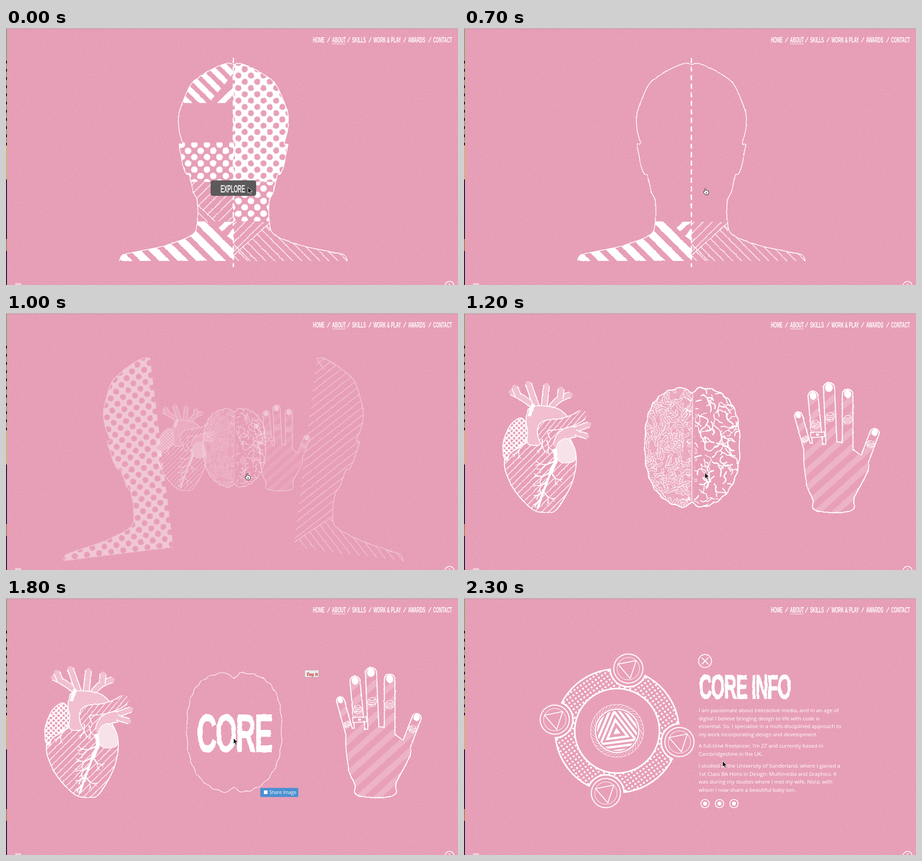
An HTML page for the animation above (2400 ms loop, 992 px wide and 565 px high).

```html
<!DOCTYPE html>
<html lang="en">
<head>
<meta charset="utf-8">
<title>About</title>
<style>
html, body { margin: 0; width: 100%; height: 100%; overflow: hidden; background: #e8a0b8; }
svg { display: block; width: 992px; height: 565px; }
.line { fill: none; stroke: #fff; stroke-linecap: round; stroke-linejoin: round; }
.cond { font-family: "Liberation Sans", Arial, sans-serif; font-weight: 700; fill: #fff; }
.big { letter-spacing: -.04em; stroke: #fff; stroke-width: 2; }
.body { font: 11.55px "Open Sans", "Noto Sans", sans-serif; fill: #fff; }
</style>
</head>
<body>
<svg id="stage" viewBox="0 0 992 565"></svg>
<script>
const PINK = '#e8a0b8', PALE = '#f1bfd0', LOOP = 2400, STEP = 100;
const $ = id => document.getElementById(id);

let seed = 11;
const rnd = () => (seed = (seed * 16807) % 2147483647) / 2147483647;

// Smooth path through a flat list of coordinates.
const nums = s => typeof s === 'string' ? s.trim().split(/\s+/).map(Number) : s;
function curve(src, closed) {
  const v = nums(src), n = v.length / 2;
  const at = i => {
    const k = closed ? (i + n) % n : Math.max(0, Math.min(n - 1, i));
    return [v[2 * k], v[2 * k + 1]];
  };
  let d = 'M' + at(0);
  for (let i = 0; i < (closed ? n : n - 1); i++) {
    const [a, b, c, e] = [at(i - 1), at(i), at(i + 1), at(i + 2)];
    const c1 = [0, 1].map(k => (b[k] + (c[k] - a[k]) / 6).toFixed(1));
    const c2 = [0, 1].map(k => (c[k] - (e[k] - b[k]) / 6).toFixed(1));
    d += `C${c1} ${c2} ${c}`;
  }
  return d + (closed ? 'Z' : '');
}

const line = (d, w = 2, more = '') => `<path class="line" d="${d}" stroke-width="${w}" ${more}/>`;
const fill = (d, f, more = '') => `<path d="${d}" fill="${f}" ${more}/>`;
const box = (x, y, w, h, f, more = '') =>
  `<rect x="${x}" y="${y}" width="${w}" height="${h}" fill="${f}" ${more}/>`;
const dot = (x, y, r, f = '#fff', more = '') => `<circle cx="${x}" cy="${y}" r="${r}" fill="${f}" ${more}/>`;
const ring = (x, y, r, w) => dot(x, y, r, 'none', `stroke="#fff" stroke-width="${w}"`);
const group = (id, body, more = '') => `<g id="${id}" ${more}>${body}</g>`;
const clip = (id, body) => `<clipPath id="${id}">${body}</clipPath>`;
const within = (id, body, more = '') => `<g clip-path="url(#${id})" ${more}>${body}</g>`;
const cond = (x, y, size, str, more = '') =>
  `<text class="cond" transform="translate(${x} ${y}) scale(.515 1)" font-size="${size}" ${more}>${str}</text>`;

// Patterns and filters
const pat = (id, x, y, size, body, turn = 0) =>
  `<pattern id="${id}" patternUnits="userSpaceOnUse" x="${x}" y="${y}" width="${size}" height="${size}" patternTransform="rotate(${turn})">${body}</pattern>`;
const five = (s, r, f) => [[0, 0], [s, 0], [0, s], [s, s], [s / 2, s / 2]].map(p => dot(p[0], p[1], r, f)).join('');
const bars = (id, period, w, turn, off = 0, ink = '#fff', paper = 'none') =>
  pat(id, 0, off, period, box(0, 0, period, period, paper) + box(0, 0, period, w, ink), turn);
const rough = (id, scale, freq) =>
  `<filter id="${id}" filterUnits="userSpaceOnUse" x="-20" y="-20" width="1040" height="620" color-interpolation-filters="sRGB">
  <feTurbulence type="fractalNoise" baseFrequency="${freq}" numOctaves="2" seed="4"/>
  <feDisplacementMap in="SourceGraphic" scale="${scale}" xChannelSelector="R" yChannelSelector="G"/></filter>`;

// Head: one half, mirrored about its middle
const MID = 499;
const half = nums(`499 80 483 78 446 94 409 120 391 155 379 190 380 225 387 253 380 257 384 280 389 305
  396 321 403 325 411 360 420 380 420 425 408 455 350 478 285 492 256 499 249 512`);
const leftEdge = curve(half);
const rightEdge = curve(half.map((v, i) => i % 2 ? v : 2 * MID - v));
const ROW = 86.8, rowTop = r => 78 + r * ROW;
const band = (side, row, look) => box(side === 'hl' ? 240 : MID, rowTop(row), 260, ROW, `url(#${look})`);

function head() {
  const left = [
    band('hl', 0, 'wideTop') + fill('M499 100V165H445Z', PINK) + fill('M463 165L499 130V146L481 165Z', '#fff'),
    '',
    band('hl', 2, 'dots'),
    fill('M400 339H499V426H457L415 386Z', 'url(#thinUp)') + line('M420 388L460 426M420 404L442 426', 1.4),
    band('hl', 4, 'wide') + fill('M445 425H499V475Z', PINK) + fill('M480 426H499L474 447L467 440ZM499 441L485 457L499 468Z', '#fff')];
  const right = ['holes', 'holes', 'holes', 'dots', 'thinDown'].map((look, r) => band('hr', r, look));
  right[4] += fill('M499 425H581L499 500Z', PINK) + fill('M499 426H581L499 500Z', 'url(#thinUp)') +
    line('M578 429L499 500M571 437L579 445M499 474L536 512', 1.5);
  const rows = (side, list) => list.map((b, r) => within(side, b, `data-row="${r}"`)).join('');
  return rows('hl', left) + rows('hr', right) + line(leftEdge, 1.7) + line(rightEdge, 1.7) +
    line('M499 67V524', 3, 'stroke-dasharray="9 9.8"');
}
const halfL = fill(leftEdge + 'L499 512Z', 'url(#holes)') + line(leftEdge, 1.7);
const halfR = within('hr', box(MID, 76, 260, 436, 'url(#thinUp)') +
  fill('M499 500L578 432L760 470V512H499Z', PINK) + fill('M510 512V490L578 432L760 470V512Z', 'url(#thinDown)') +
  line('M578 432L499 500M499 81L520 104', 1.5)) + line(rightEdge, 1.7);

// Heart
function twig(x, y, a, len, w) {
  if (len < 6) return '';
  const x2 = x + Math.cos(a) * len, y2 = y + Math.sin(a) * len;
  return line(`M${x} ${y}L${x2} ${y2}`, w) +
    [-1, 1].map(s => twig(x2, y2, a + s * (.35 + rnd() * .4), len * .62, w * .75)).join('');
}
function heart() {
  const tube = (d, w, f = PALE) => line(d, w + 4, 'style="stroke-linecap:butt"') + line(d, w, `style="stroke:${f}"`);
  const part = (pts, f, w = 2) => fill(curve(pts, true), f) + line(curve(pts, true), w);
  const veins = [[201, 325], [190, 350], [183, 370], [174, 392], [166, 412]]
    .map(([x, y], i) => twig(x, y, 2.75 - i * .1, 23 - 3 * i, 3) + (i % 2 ? twig(x, y, .9, 17, 2.6) : '')).join('');
  return part('90 320 137 285 200 240 243 300 240 365 205 430 180 438 148 430 105 380', 'url(#thinHeart)', 2.2) +
    ['M162 214Q140 190 104 174', 'M119 182L111 163', 'M163 216L141 155', 'M175 214L181 159', 'M187 218Q198 188 233 180', 'M211 188L213 167']
      .map(d => tube(d, 11)).join('') +
    part('138 264 137 225 150 206 190 206 214 215 227 238 175 262 168 288 141 288', PALE) +
    line('M151 203L144 224', 8) +
    tube('M180 284Q160 246 192 246Q232 244 259 224', 21, 'url(#thinTube)') +
    tube('M208 290Q212 262 246 261', 22) + tube('M244 256L274 245', 10) + tube('M244 263L270 271', 10) +
    part('127 231 139 255 134 285 102 308 96 322 89 320 86 285 103 245', 'url(#holesSmall)') +
    part('204 290 225 276 244 300 241 326 209 326', '#f8e2ea', 1.4) +
    line(curve('199 302 201 325 190 350'), 8) + line(curve('190 350 176 388 162 428'), 5) + veins +
    [[125, 290], [172, 278], [182, 280]].map(([x, y], i) => twig(x, y, 1.9 - i * .3, 16, 2.4)).join('');
}

// Brain: a squarish oval with a scalloped edge and a notch at each end
function oval() {
  const pts = [];
  for (let i = 0; i < 120; i++) {
    const a = i / 120 * Math.PI * 2, s = Math.sin(a), c = Math.cos(a), p = c > 0 ? 2 / 2.8 : 2 / 2.3;
    const bump = 1 + .01 * Math.sin(a * 27);
    const dx = 104 * Math.sign(s) * Math.abs(s) ** p * bump;
    const dy = -132 * Math.sign(c) * Math.abs(c) ** p * bump;
    pts.push(501 + dx, 296 + dy + Math.sign(c) * 12 * Math.exp(-dx * dx / 90));
  }
  return curve(pts, true);
}
const brainEdge = oval();
function worm(x, y, n, len) {
  let a = rnd() * 6.3;
  const p = [x, y];
  for (let i = 0; i < n; i++) {
    a += (rnd() - .5) * 2;
    p.push(x += Math.cos(a) * len, y += Math.sin(a) * len);
  }
  return curve(p);
}
function folds() {
  let s = box(390, 160, 112, 270, PALE, 'opacity=".35"');
  for (let y = 172; y < 426; y += 13)
    for (let x = 400; x < 492; x += 15) {
      const d = worm(x + rnd() * 8, y + rnd() * 8, 4, 6);
      s += line(d, 6) + line(d, 4.2, 'style="stroke:#ecb0c5"');
    }
  for (let y = 174; y < 426; y += 15)
    for (let x = 512; x < 604; x += 16)
      s += line(worm(x + rnd() * 9, y + rnd() * 9, 5, 6), 1.4 + rnd() * 1.6);
  return within('brainClip', s + line('M505 172Q501 290 501 424', 8, `style="stroke:${PINK}"`) +
    line('M502 180Q500 290 500 414', 1.5));
}

// Hand: fingers as capsules joined to a palm
// tip x, tip y, base x, base y, width, knuckle position
const fingers = [[734, 226, 758, 312, 15, .6], [766, 183, 777, 300, 20, .53], [801, 165, 807, 300, 22, .47],
  [842, 179, 842, 300, 21, .46], [901, 264, 873, 338, 18, .33]];
function hand() {
  const palm = curve('749 295 753 375 767 410 769 431 811 438 853 431 856 405 887 337 860 306 826 285 790 290', true);
  const skin = 'style="stroke:url(#softBars)"';
  const bones = fingers.map(([x, y, bx, by]) => `M${x} ${y}L${bx} ${by}`);
  const details = fingers.map(([x, y, bx, by, w, k]) => {
    const turn = Math.atan2(by - y, bx - x) * 180 / Math.PI - 90, len = Math.hypot(bx - x, by - y) * k, r = w * .44;
    return `<g transform="translate(${x} ${y}) rotate(${turn})"><ellipse cy="-1" rx="${w * .38}" ry="${w * .44}" fill="#fff"/>
      <g transform="translate(0 ${len})">${dot(0, 0, r, PINK, 'stroke="#fff" stroke-width="1.3"')}
      ${[-.45, 0, .45].map(j => line(`M${-r * .7} ${j * r}Q0 ${j * r + 2} ${r * .7} ${j * r}`, 1.8)).join('')}</g></g>`;
  }).join('');
  return line(palm, 4.5) + bones.map((d, i) => line(d, fingers[i][4] + 4.5)).join('') +
    fill(palm, 'url(#softBars)') + bones.map((d, i) => line(d, fingers[i][4], skin)).join('') + details +
    box(761, 262, 30, 11, PINK, 'stroke="#fff" stroke-width="2" transform="rotate(-4 776 268)"') + box(773, 265, 6, 5, '#fff');
}

// Info panel
const paragraphs = [
  [251, ['I am passionate about interactive media, and in an age of', 'digital I believe bringing design to life with code is',
    'essential. So, I specialise in a multi-disciplined approach to', 'my work incorporating design and development.']],
  [329.4, ['A full-time freelancer, I’m 27 and currently based in', 'Cambridgeshire in the UK.']],
  [373, ['I studied at the University of Sunderland, where I gained a', '1st Class BA Hons in Design: Multimedia and Graphics. It',
    'was during my studies where I met my wife, Nora; with', 'whom I now share a beautiful baby son.']]];
const copy = paragraphs.map(([y, rows]) =>
  rows.map((s, i) => `<text class="body" x="515" y="${y + i * 17.5}">${s}</text>`).join('')).join('');

function wheel() {
  const badges = [0, 90, 180, 270].map(a => {
    const r = a * Math.PI / 180, x = 139 * Math.sin(r), y = -139 * Math.cos(r);
    return dot(x, y, 39, PINK) + within('disc', ring(x, y, 40, 3.4)) +
      `<g transform="translate(${x} ${y})">${ring(0, 0, 32, 2.2)}${ring(0, 0, 24.5, 1)}
      <path class="line tri" d="M-20.5 -14H20.5L0 22Z" stroke-width="1.9"/></g>`;
  }).join('');
  const edge = 'stroke="#fff" stroke-width="3.4"';
  return dot(0, 0, 136, 'url(#fine)', edge) + dot(0, 0, 93, PINK, edge) + badges;
}
function emblem() {
  const tri = r => `M0 ${-2 * r}L${1.732 * r} ${r}H${-1.732 * r}Z`;
  let rays = '';
  for (let a = 0; a < 6.28; a += .16)
    rays += `M${47 * Math.cos(a)} ${47 * Math.sin(a)}L${58 * Math.cos(a + .3)} ${58 * Math.sin(a + .3)}`;
  let stripes = '';
  for (let r = 13; r < 45; r += 9.5) stripes += line(tri(r), 5, 'style="stroke-linejoin:miter"');
  return ring(0, 0, 58, 1) + line(rays, .8) + ring(0, 0, 47.5, 2.2) +
    within('core', `<g transform="translate(-1 2)">${fill(tri(4.5), '#fff')}${stripes}</g>`);
}

// Page frame
const nav = [[674, 'HOME'], [716, 'ABOUT'], [760, 'SKILLS'], [807, 'WORK &amp; PLAY'], [883, 'AWARDS'], [938, 'CONTACT']];
const frame = box(0, 0, 992, 1, '#dcd6d8') + box(0, 1, 992, 1, '#a98f99') +
  box(0, 2, 2, 250, '#7fa86a') + box(0, 250, 2, 83, '#c6bd62') + box(0, 333, 2, 232, '#14142e') + box(0, 464, 2, 26, '#a87f4e') +
  line('M1 72V262', 2, 'style="stroke:#111;stroke-linecap:butt" stroke-dasharray="6 12"') +
  nav.map(([x, s], i) => cond(x - .5, 31.6, 16.7, s) + (i ? line(`M${x - 10.5} 31L${x - 5.5} 21`, 1.6) : '')).join('') +
  box(716, 34.5, 29, 1, '#fff') + box(20, 561, 13, 4, '#fff', 'opacity=".5"') + ring(973.5, 567, 10, 1.7) + dot(973.5, 563, 1.3);

const arrow = fill('M0 0V13L3 10.3L5.2 15.2L7.5 14.2L5.4 9.5H9.5Z', '#111', 'stroke="#fff" stroke-width=".9"');
const pointer = fill('M3.5 8V2Q4.7 0 6 2V5.5Q7.5 4.6 8.2 6Q10 5.2 10.5 6.8Q12.5 6.5 12.5 8.5V11L10.8 15H5L1 10Q0 7.4 2 8Z',
  '#fff', 'stroke="#111" stroke-width="1"') + line('M6.5 9.5V12.5M8.5 9.5V12.5', .8, 'style="stroke:#111"');

const ROUGH = 'filter="url(#rough)"', INK = 'filter="url(#ink)"';
$('stage').innerHTML = `<defs>
  ${pat('dots', 468.6, 256.2, 27.6, five(27.6, 7.2, '#fff'))}
  ${pat('holes', 468.6, 256.2, 27.6, box(0, 0, 27.6, 27.6, '#fff') + five(27.6, 6.7, PINK))}
  ${pat('holesSmall', 0, 0, 11, box(0, 0, 11, 11, '#fff') + five(11, 2.7, PINK))}
  ${pat('fine', 0, 0, 12, five(12, 2.3, '#fff'))}
  ${bars('wideTop', 22.6, 12.5, 45, 8)}${bars('wide', 29, 17, 45, -8.5)}
  ${bars('thinUp', 14, 1.5, -45)}${bars('thinDown', 14, 1.5, 45)}
  ${bars('thinHeart', 11, 1.5, -45, 0, '#fff', PINK)}${bars('thinTube', 9, 1.4, -50, 0, '#fff', PINK)}
  ${bars('softBars', 27, 13, -42, 0, '#edb3c6', PINK)}
  ${rough('rough', 2.6, .12)}${rough('ink', 3.5, .08)}
  <filter id="grain" x="0" y="0" width="1" height="1" color-interpolation-filters="sRGB">
  <feTurbulence type="fractalNoise" baseFrequency=".25" numOctaves="2" seed="2"/>
  <feColorMatrix values="0 0 0 0 .78  0 0 0 0 .47  0 0 0 0 .6  .35 0 0 0 -.15"/></filter>
  ${clip('hl', fill(leftEdge + 'L499 512Z', '#000'))}${clip('hr', fill(rightEdge + 'L499 512Z', '#000'))}
  ${clip('brainClip', fill(brainEdge, '#000'))}${clip('disc', dot(0, 0, 137.5))}${clip('core', dot(0, 0, 44))}
</defs>
${box(0, 0, 992, 565, PINK)}${box(0, 0, 992, 565, PINK, 'filter="url(#grain)"')}
${group('head', head(), ROUGH)}
${group('button', box(449, 335, 100, 34, '#5d595a', 'rx="5"') + cond(471, 360.5, 22, 'EXPLORE', 'style="font-weight:400" stroke="#fff" stroke-width=".8"'))}
${group('halfL', halfL, ROUGH)}${group('halfR', halfR, ROUGH)}
${group('heart', heart(), ROUGH)}${group('palm', hand(), ROUGH)}
${group('brain', group('folds', folds()) + `<path id="rim" class="line" d="${brainEdge}"/>`, ROUGH)}
${group('label', group('word', cond(419, 338, 117, 'CORE', 'class="cond big"').replace('class="cond" ', ''), INK) +
  box(655.5, 158.5, 31, 15.5, '#eee9e6', 'stroke="#b9a8ad"') +
  '<text x="659" y="170.5" font-family="Liberation Serif, serif" font-size="11" font-weight="700" font-style="italic" fill="#c2202c">Tag it</text>' +
  box(558, 417.5, 83.5, 20, '#4b90d0', 'rx="2"') + box(566, 423, 8, 8, '#fff') +
  '<text class="body" x="578" y="431" style="font-size:10.2px">Share Image</text>')}
${group('info', `<g transform="translate(336 292)"><g id="wheel">${wheel()}</g><g id="emblem">${emblem()}</g></g>` +
  ring(529, 138.5, 14.3, 2) + line('M522 131.5L536 145.5M536 131.5L522 145.5', 2) +
  `<g ${INK}>${cond(516, 221, 75, 'CORE INFO', 'class="cond big"').replace('class="cond" ', '')}</g>` + copy +
  [529, 560.7, 592.5].map(x => ring(x, 452, 9.2, 1.8) + dot(x, 452, 4.5)).join(''))}
${frame}
${group('arrow', arrow)}${group('pointer', pointer)}`;

const show = (id, on) => { $(id).style.display = on ? '' : 'none'; };
const place = (id, tf) => $(id).setAttribute('transform', tf);
const ramp = (t, from, to) => Math.max(0, Math.min(1, (t - from) / (to - from)));
const rows = [...document.querySelectorAll('[data-row]')];
const tris = [...document.querySelectorAll('.tri')];

// Mouse path: time, x, y
const path = [[0, 531, 350], [1200, 528.5, 351], [1500, 503, 316], [1600, 500, 308], [2000, 498.5, 308], [2300, 567.5, 358.5]];
function mouse(t) {
  const i = Math.max(1, path.findIndex(p => p[0] >= t)), [a, b] = [path[i - 1], path[i]];
  const k = ramp(t, a[0], b[0]);
  return [a[1] + (b[1] - a[1]) * k, a[2] + (b[2] - a[2]) * k];
}

function draw(t) {
  show('head', t < 800);
  show('button', t < 600);
  rows.forEach(e => { e.style.display = e.dataset.row === '4' || t < 100 * (+e.dataset.row + 1) ? '' : 'none'; });

  // The head splits and fades
  const p = ramp(t, 800, 1100), dx = 178 * p * p * (3 - 2 * p);
  [['halfL', -1], ['halfR', 1]].forEach(([id, dir]) => {
    show(id, t >= 800 && t < 1200);
    place(id, `translate(${MID + dir * dx} ${512 + dx * .025}) rotate(${dir * dx * .053}) scale(${1 - dx * .00023}) translate(${-MID} -512)`);
    $(id).style.opacity = 1 - .87 * p;
  });

  // The organs grow apart from the centre
  const q = ramp(t, 800, 1200), travel = q ** 1.6;
  [['heart', 180], ['brain', 500], ['palm', 820]].forEach(([id, x]) => {
    show(id, t >= 900 && t < 2000);
    place(id, `translate(${501 - travel + (x - 500) * travel} ${297 - travel}) scale(${.32 + .68 * q}) translate(${-x} -296)`);
    $(id).style.opacity = q ** 1.25;
  });
  const hover = ramp(t, 1300, 1500);
  $('folds').style.opacity = 1 - hover;
  $('rim').style.strokeWidth = 2.4 - 1.2 * hover;
  show('label', hover > 0 && t < 2000);
  $('word').style.opacity = hover;

  show('info', t >= 2000);
  const turn = 2.9 + (t - 2000) * .0243;
  place('wheel', `rotate(${turn})`);
  place('emblem', `rotate(${2.9 - turn})`);
  tris.forEach(e => e.setAttribute('transform', `rotate(${-2.1 * turn})`));

  const [x, y] = mouse(t), pointing = (t >= 100 && t < 1200) || (t >= 1400 && t < 1800);
  show('arrow', !pointing);
  show('pointer', pointing);
  place('arrow', `translate(${x} ${y})`);
  place('pointer', `translate(${x - 5} ${y + 1})`);
}

const start = performance.now();
let last = -1;
function tick(now) {
  const t = Math.floor(Math.max(0, now - start) % LOOP / STEP) * STEP;
  if (t !== last) draw(last = t);
  requestAnimationFrame(tick);
}
draw(0);
requestAnimationFrame(tick);
</script>
</body>
</html>
```
